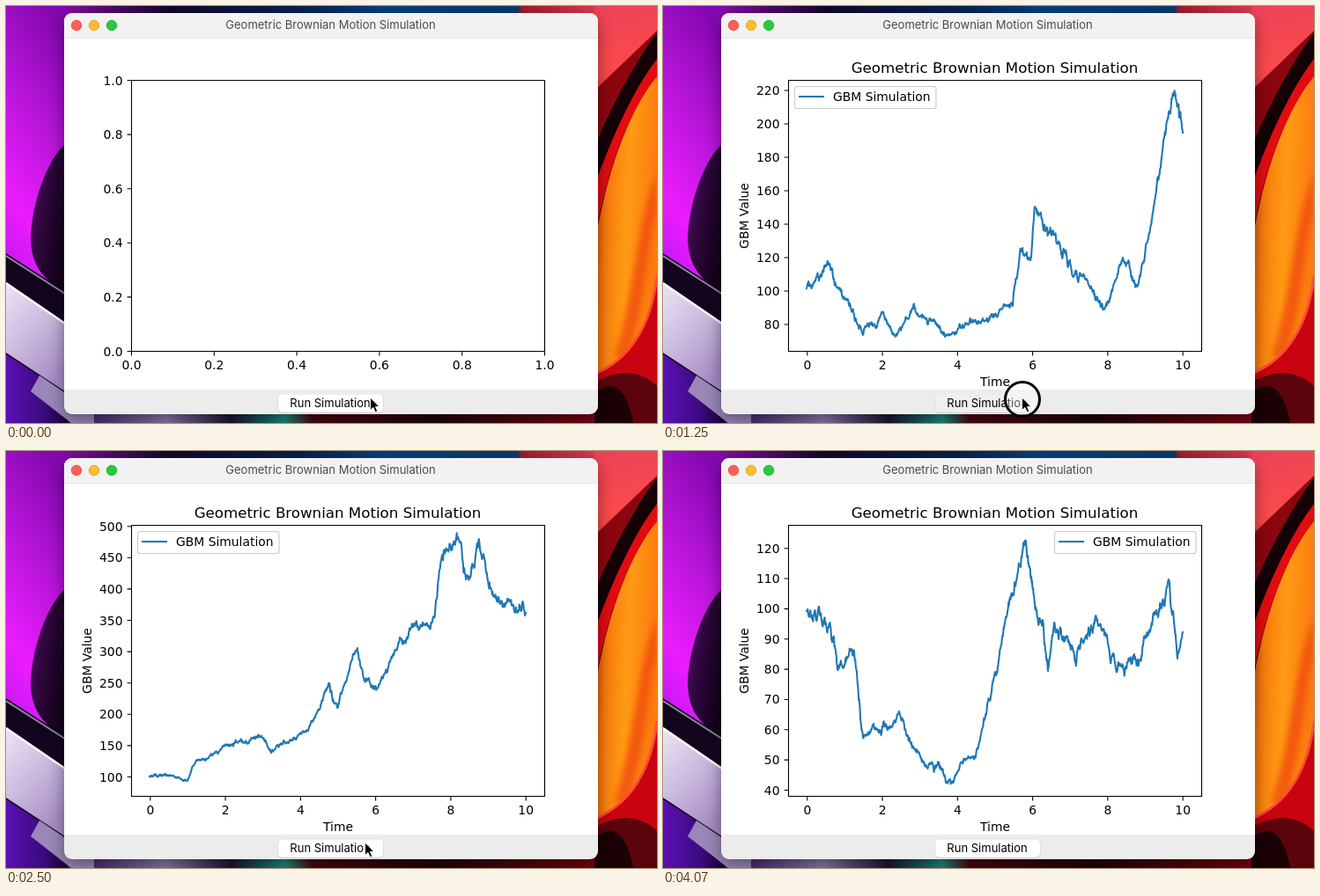
These frames come from a looping animation (739 px wide and 474 px high, 4380 ms). An HTML page:

```html
<!DOCTYPE html>
<html lang="en">
<head>
<meta charset="utf-8">
<title>Geometric Brownian Motion Simulation</title>
<style>
  html, body { margin: 0; width: 100%; height: 100%; overflow: hidden; }
  svg { display: block; width: 739px; height: 474px; }
  .ui { font: 13px Inter, "Open Sans", sans-serif; text-anchor: middle; }
  .plot { font: 13.89px "DejaVu Sans", sans-serif; }
  .axes { fill: none; stroke: #000; stroke-width: 1.1; }
  .curve { fill: none; stroke: #1f77b4; stroke-width: 2.08; stroke-linejoin: round; stroke-linecap: square; }
  .mid { text-anchor: middle; }
  .end { text-anchor: end; }

  .plot, .press, .ring, .cursor { visibility: hidden; animation: 4380ms step-end infinite; }
  .p0 { animation-name: p0; }
  .p1 { animation-name: p1; }
  .p2 { animation-name: p2; }
  .p3 { animation-name: p3; }
  .p4 { animation-name: p4; }
  .press { animation-name: press; }
  .ring { animation-name: ring; }
  .cursor { animation-name: pointer, nudge; }
  @keyframes p0 { 0% { visibility: visible; } 11.4155% { visibility: hidden; } }
  @keyframes p1 { 11.4155% { visibility: visible; } 34.2466% { visibility: hidden; } }
  @keyframes p2 { 34.2466% { visibility: visible; } 57.0776% { visibility: hidden; } }
  @keyframes p3 { 57.0776% { visibility: visible; } 79.9087% { visibility: hidden; } }
  @keyframes p4 { 79.9087%, 100% { visibility: visible; } }
  @keyframes press {
    5.7078%, 28.5388%, 51.3699%, 74.2009% { visibility: visible; }
    11.4155%, 34.2466%, 57.0776%, 79.9087% { visibility: hidden; }
  }
  @keyframes ring {
    5.7078%, 28.5388%, 74.2009% { visibility: visible; }
    11.4155%, 34.2466%, 79.9087% { visibility: hidden; }
  }
  @keyframes pointer { 0% { visibility: visible; } 85.6164% { visibility: hidden; } }
  @keyframes nudge { 0% { transform: translate(6px, 0); } 5.7078%, 100% { transform: none; } }
</style>
</head>
<body>
<svg viewBox="0 0 739 474">
  <defs>
    <linearGradient id="violet" x1=".6" y1="0" x2=".3" y2="1">
      <stop offset="0" stop-color="#8508b0"/><stop offset=".35" stop-color="#b414d6"/>
      <stop offset=".75" stop-color="#ec1cff"/><stop offset="1" stop-color="#c018f0"/>
    </linearGradient>
    <linearGradient id="plum" x1="0" y1="0" x2="1" y2=".6">
      <stop offset="0" stop-color="#5a0a78"/><stop offset=".5" stop-color="#2c0638"/><stop offset="1" stop-color="#12021a"/>
    </linearGradient>
    <linearGradient id="lilac" x1="0" y1="0" x2=".6" y2="1">
      <stop offset="0" stop-color="#efe4f5"/><stop offset=".5" stop-color="#cdbbdf"/><stop offset="1" stop-color="#a48cc4"/>
    </linearGradient>
    <linearGradient id="indigo">
      <stop offset="0" stop-color="#5c10b4"/><stop offset=".6" stop-color="#3c0a80"/><stop offset="1" stop-color="#180430"/>
    </linearGradient>
    <linearGradient id="top">
      <stop offset="0" stop-color="#8a0cac"/><stop offset=".2" stop-color="#12082a"/>
      <stop offset=".45" stop-color="#06224e"/><stop offset=".6" stop-color="#06407e"/><stop offset=".85" stop-color="#073a70"/>
      <stop offset=".86" stop-color="#a01c30"/><stop offset="1" stop-color="#e03a50"/>
    </linearGradient>
    <linearGradient id="bottom">
      <stop offset="0" stop-color="#2a0a50"/><stop offset=".2" stop-color="#8a78a8"/><stop offset=".32" stop-color="#1c1430"/>
      <stop offset=".42" stop-color="#1c8a80"/><stop offset=".47" stop-color="#4c0610"/>
      <stop offset=".7" stop-color="#20040a"/><stop offset="1" stop-color="#7a0410"/>
    </linearGradient>
    <linearGradient id="coral" x1=".3" y1="0" x2=".4" y2="1">
      <stop offset="0" stop-color="#ee4258"/><stop offset=".35" stop-color="#fa4a4a"/><stop offset="1" stop-color="#d81418"/>
    </linearGradient>
    <linearGradient id="orange" x2="1" y2=".2">
      <stop offset="0" stop-color="#d83a08"/><stop offset=".25" stop-color="#f87a0c"/>
      <stop offset=".6" stop-color="#ff9a14"/><stop offset="1" stop-color="#fb7c10"/>
    </linearGradient>
    <filter id="soft" x="-30%" y="-30%" width="160%" height="160%"><feGaussianBlur stdDeviation="3"/></filter>
    <filter id="shade" x="-10%" y="-10%" width="120%" height="125%"><feGaussianBlur stdDeviation="9"/></filter>
  </defs>

  <!-- wallpaper -->
  <rect width="739" height="474" fill="#180420"/>
  <rect x="60" width="612" height="12" fill="url(#top)"/>
  <rect x="60" y="460" width="612" height="14" fill="url(#bottom)"/>
  <rect width="70" height="330" fill="url(#violet)"/>
  <path d="M70 154C48 172 30 220 28 262C28 292 40 312 70 326Z" fill="url(#plum)"/>
  <path d="M0 281L70 326V380L0 330Z" fill="#12061e"/>
  <path d="M0 284L70 329" stroke="#8e849c" stroke-width="2"/>
  <path d="M0 314L70 362V440L0 394Z" fill="url(#lilac)"/>
  <path d="M0 315L70 363" stroke="#fff" stroke-width="2.5"/>
  <path d="M0 396L70 442V474H0Z" fill="url(#indigo)"/>
  <path d="M38 420L100 462V474H74L28 438Z" fill="#9a86b8"/>
  <path d="M668 0H739V200H668Z" fill="url(#coral)"/>
  <path d="M668 96L739 28V90L668 240Z" fill="#8c0610"/>
  <path d="M739 30C712 68 688 112 668 160V206C690 150 712 100 739 62Z" fill="#140206"/>
  <path d="M739 60C712 96 690 144 668 204V270C680 190 706 120 739 84Z" fill="#e00c10"/>
  <path d="M739 80C708 118 682 186 668 272V420H739Z" fill="url(#orange)"/>
  <path d="M739 190C716 240 718 310 690 400L706 402C730 330 728 260 739 236Z" fill="#f04808" opacity=".75" filter="url(#soft)"/>
  <path d="M739 306C732 362 708 402 668 420V474H739Z" fill="#c80410"/>
  <path d="M739 308C732 364 708 402 668 418" fill="none" stroke="#ff4a34" stroke-width="3"/>
  <path d="M668 428C692 414 718 412 739 432V474H668Z" fill="#5c040c"/>
  <path d="M668 440C688 424 704 432 712 474H668Z" fill="#1a0206"/>

  <!-- window -->
  <rect x="66" y="14" width="606" height="456" rx="10" opacity=".4" filter="url(#shade)"/>
  <rect x="66" y="8" width="606" height="456" rx="9" fill="#ececec"/>
  <path d="M66 37V17A9 9 0 0 1 75 8H663A9 9 0 0 1 672 17V37Z" fill="#f3f2f3"/>
  <path d="M66 36.5H672" stroke="#e4e4e4"/>
  <rect x="66" y="37" width="606" height="399" fill="#fff"/>
  <g stroke-width=".8">
    <circle cx="80" cy="22" r="5.8" fill="#ff5f57" stroke="#e0483f"/>
    <circle cx="100" cy="22" r="5.8" fill="#febc2e" stroke="#dfa023"/>
    <circle cx="120" cy="22" r="5.8" fill="#28c840" stroke="#1dad2b"/>
  </g>
  <text class="ui" x="368.5" y="26" font-weight="700" fill="#4b4b4b">Geometric Brownian Motion Simulation</text>

  <g id="plots"></g>

  <!-- button and pointer -->
  <rect x="308.5" y="441.5" width="120" height="21.5" rx="5.5" fill="#cfcfcf"/>
  <rect x="309" y="441.5" width="119" height="20.5" rx="5" fill="#fff"/>
  <rect class="press" x="309" y="441.5" width="119" height="20.5" rx="5" fill="#efefef"/>
  <text class="ui" x="368" y="456">Run Simulation</text>
  <circle class="ring" cx="408" cy="447" r="19.5" fill="#fff" fill-opacity=".35" stroke="#000" stroke-width="3"/>
  <path class="cursor" d="M407.5 445V459.6L410.9 456.5L413.2 461.8L415.8 460.7L413.5 455.5H418Z" stroke="#fff"/>
</svg>

<script>
const TITLE = "Geometric Brownian Motion Simulation";

// run: main turning points as x, y pairs
// axis: lowest label, its pixel, label step, pixel step, label count
const charts = [
  {
    run: [163,321, 187,290, 227,374, 248,348, 262,373, 284,342, 321,375, 397,341, 406,276, 418,286,
      422,228, 440,256, 471,313, 501,344, 522,286, 540,314, 556,235, 579,100, 590,144],
    axis: [80, 362, 20, 38, 8]
  },
  {
    run: [163,350, 180,290, 220,347, 245,270, 266,215, 277,285, 298,314, 307,266, 335,278, 356,350,
      418,374, 465,252, 471,188, 488,208, 519,135, 547,188, 565,103, 574,166, 581,102, 590,199],
    axis: [100, 347.8, 20, 48.85, 6]
  },
  {
    run: [163,370, 206,375, 215,354, 247,335, 289,325, 301,343, 343,318, 367,264, 376,292, 395,230,
      421,270, 447,212, 486,188, 494,124, 516,104, 522,146, 536,104, 557,170, 590,184],
    axis: [100, 370.5, 50, 35.6, 9]
  },
  {
    run: [163,182, 190,200, 198,248, 217,228, 227,326, 270,304, 285,338, 327,376, 357,338, 376,256,
      412,102, 437,250, 444,195, 468,240, 492,190, 510,232, 541,238, 574,146, 584,236, 590,206],
    axis: [40, 385.5, 10, 34.35, 9],
    legendX: 444.5
  }
];

function randomFrom(seed) {
  return () => (seed = (seed * 16807) % 2147483647) / 2147483647;
}

// Join the turning points with damped random walks scaled by the value
function walkPath(run, zeroY, seed) {
  const rand = randomFrom(seed);
  let d = `M${run[0]} ${run[1]}`;
  for (let i = 2; i < run.length; i += 2) {
    const [x0, y0, x1, y1] = run.slice(i - 2, i + 2);
    const n = Math.round((x1 - x0) / 0.43);
    const size = 0.009 * (zeroY - y0);
    const walk = [0];
    for (let k = 1; k <= n; k++) walk.push(walk[k - 1] * 0.93 + (rand() + rand() + rand() - 1.5) * 2 * size);
    for (let k = 1; k <= n; k++) {
      const t = k / n;
      const y = y0 + (y1 - y0) * t + walk[k] - walk[n] * t;
      d += `L${(x0 + (x1 - x0) * t).toFixed(2)} ${y.toFixed(2)}`;
    }
  }
  return d;
}

const label = (x, y, text, cls = "mid", extra = "") =>
  `<text class="${cls}" x="${x}" y="${y}" ${extra}>${text}</text>`;

function frame(xTicks, yTicks) {
  let d = "M142.5 84.5H611.5V392.5H142.5Z", text = "";
  for (const [x, s] of xTicks) { d += `M${x} 392.5v4.9`; text += label(x, 413, s); }
  for (const [y, s] of yTicks) { d += `M142.5 ${y}h-4.9`; text += label(132.5, y + 5, s, "end"); }
  return `<path class="axes" d="${d}"/>${text}`;
}

const ticks = (n, at, text) => Array.from({ length: n }, (_, i) => [at(i), text(i)]);

function legend(x) {
  return `<rect x="${x}" y="91.5" width="160.5" height="25" rx="2.8" fill="#fff" fill-opacity=".8" stroke="#ccc" stroke-width="1.2"/>
    <path class="curve" d="M${x + 5.5} 103h27"/>` + label(x + 43.5, 108, "GBM Simulation", "");
}

function chart({ run, axis, legendX = 149.5 }, i) {
  const [low, lowY, step, gap, count] = axis;
  const zeroY = lowY + low / step * gap;
  return `<g class="plot p${i + 1}">
    <path class="curve" d="${walkPath(run, zeroY, 4021 + i * 977)}"/>` +
    frame(ticks(6, k => 163.8 + 85.27 * k, k => 2 * k), ticks(count, k => lowY - gap * k, k => low + step * k)) +
    label(376.5, 76, TITLE, "mid", 'font-size="16.67"') +
    label(377, 432, "Time") +
    label(0, 0, "GBM Value", "mid", 'transform="translate(96.5 238.5) rotate(-90)"') +
    legend(legendX) + "</g>";
}

const fifths = k => (k / 5).toFixed(1);
document.getElementById("plots").innerHTML =
  `<g class="plot p0">${frame(ticks(6, k => 142.5 + 93.8 * k, fifths), ticks(6, k => 392.5 - 61.6 * k, fifths))}</g>` +
  charts.map(chart).join("");
</script>
</body>
</html>
```
